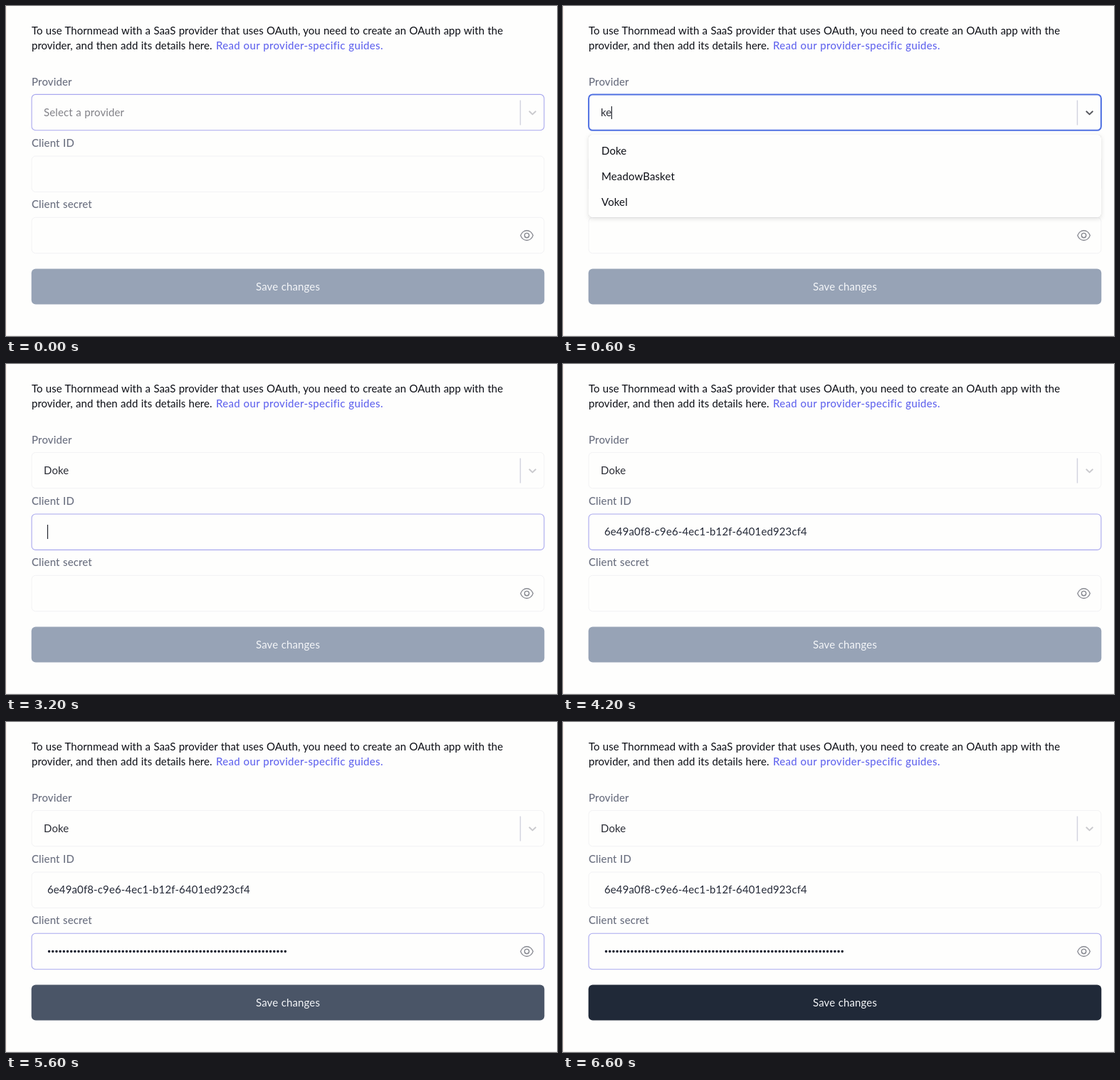
These frames come from a looping animation (774 px wide and 464 px high, 6.8 s). An HTML page:

```html
<!DOCTYPE html>
<html lang="en">
<head>
<meta charset="utf-8">
<title>Provider credentials form</title>
<style>
  html, body { margin: 0; width: 100%; height: 100%; overflow: hidden; background: #fefefd; }
  svg { display: block; width: 774px; height: 464px; }
  text { font: 400 15px Lato, "Open Sans", sans-serif; letter-spacing: .12px; word-spacing: .5px; fill: #0d0f16; white-space: pre; }
  .intro { letter-spacing: 0; }
  .label { font-weight: 500; fill: #6b7080; }
  .link { font-weight: 500; fill: #6467ee; letter-spacing: .3px; }
  .save { fill: #f4f6f9; text-anchor: middle; }
  .value { fill: #252a38; }
  .line { fill: none; stroke-linecap: round; stroke-linejoin: round; }
  .menu { filter: drop-shadow(0 0 .6px rgba(0,0,0,.28)) drop-shadow(0 2px 3px rgba(0,0,0,.12)); }
</style>
</head>
<body>
<svg viewBox="0 0 774 464">
  <rect width="774" height="464" fill="#fefefd"/>
  <path d="M.5 0V464" stroke="#fdeee8"/>
  <path d="M0 463.5H774" stroke="#f0efee"/>

  <text class="intro" x="36" y="39.5">To use Thornmead with a SaaS provider that uses OAuth, you need to create an OAuth app with the</text>
  <text class="intro" x="36" y="61">provider, and then add its details here.</text>
  <text class="link" x="295" y="61">Read our provider-specific guides.</text>

  <text class="label" x="36" y="111.5">Provider</text>
  <text class="label" x="36" y="197.5">Client ID</text>
  <text class="label" x="36" y="284">Client secret</text>

  <g id="fields" fill="#fefefd">
    <rect x="36.1" y="124.4" width="719.8" height="50.4" rx="5.5"/>
    <rect x="36.1" y="211" width="719.8" height="50.4" rx="5.5"/>
    <rect x="36.1" y="297.3" width="719.8" height="50.4" rx="5.5"/>
  </g>

  <text id="provider" x="53" y="154.5"></text>
  <path d="M722.5 132.5V167.5" stroke="#d1d2de" stroke-width="1.4"/>
  <path id="chevron" class="line" d="M735.3 148.3L739.6 152.4L743.9 148.3" stroke-width="1.9"/>

  <text id="clientId" class="value" x="58" y="241"></text>
  <path id="dots" class="line" d="M60.6 322.6H392.4" stroke="#1c2130" stroke-width="3.6" stroke-dasharray="0 5.183"/>
  <g class="line" transform="translate(731.6 322.6) scale(.86) translate(-12 -12)" stroke="#85878f" stroke-width="1.6">
    <path d="M2 12.3a1 1 0 0 1 0-.6C3.4 7.5 7.4 4 12 4s8.6 3.5 10 7.7a1 1 0 0 1 0 .6C20.6 16.5 16.6 20 12 20S3.4 16.5 2 12.3z"/>
    <circle cx="12" cy="12" r="3.7"/>
  </g>

  <rect id="button" x="35.7" y="369.5" width="720.6" height="50" rx="6"/>
  <text class="save" x="396" y="399.5">Save changes</text>

  <g id="menu" class="menu">
    <rect id="panel" x="36" y="181" width="720" rx="4.5" fill="#fefefd"/>
    <g id="options"></g>
  </g>
  <path id="caret" stroke="#23262f" stroke-width="1.2"/>
</svg>

<script>
const LOOP = 6800;
const ROW = 36;
const $ = id => document.getElementById(id);
const fields = [...$('fields').children];

const idle = ['#f2f2f4', 1];
const focus = ['#a9a8ee', 1.1];
const active = ['#4f70e2', 2];
const settling = ['#72a0ea', 1.5];

const matches = ['Doke', 'MeadowBasket', 'Vokel'];
const all = ['Aldervane', 'Brookpost', 'Cindermail', 'Doke', 'Elmledger', 'Fernclock', 'Gladecart'];
const withK = ['Brookpost', 'Doke', 'Fernclock', 'Kindlefold', 'Larkspool', 'MeadowBasket', 'Vokel'];
const secretEnd = 394.5;

const start = {
  provider: 'Select a provider', hint: true, open: null, chevron: '#c9c9cd',
  borders: [focus, idle, idle], clientId: '', secret: false, caret: null, button: '#97a3b6'
};

// Each step keeps whatever it does not override.
const steps = [
  [200, { open: all, borders: [active, idle, idle], chevron: '#55565c', caret: 'hint' }],
  [400, { open: withK, provider: 'k', hint: false, caret: 'provider' }],
  [600, { open: matches, provider: 'ke' }],
  [1400, { caret: null }],
  [1600, { open: null, provider: 'Doke' }],
  [2000, { borders: [settling, idle, idle], caret: 'clientId' }],
  [3200, { borders: [idle, focus, idle], chevron: '#c9c9cd' }],
  [3400, { clientId: '6e49a0f8-c9e6-4ec1-b12f-6401ed923cf4' }],
  [4200, { caret: null }],
  [4600, { borders: [idle, idle, focus], caret: 'secret' }],
  [5000, { secret: true }],
  [5200, { button: '#283241' }],
  [5400, { button: '#202938', caret: null }],
  [5600, { button: '#4a5567' }],
  [6000, { button: '#2d3848' }],
  [6600, { button: '#202938' }]
];

function stateAt(time) {
  return Object.assign({}, start, ...steps.filter(([at]) => at <= time).map(step => step[1]));
}

function set(el, attrs) {
  for (const name in attrs) el.setAttribute(name, attrs[name]);
}

function drawMenu(names) {
  $('menu').style.display = names ? '' : 'none';
  if (!names) return;
  const pad = names.length > 3 ? 18 : 8;
  set($('panel'), { height: names.length * ROW + pad });
  $('options').innerHTML = names
    .map((name, i) => `<text x="54" y="${208.5 + i * ROW}">${name}</text>`)
    .join('');
}

function textEnd(id, x) {
  const el = $(id);
  return x + (el.textContent ? el.getComputedTextLength() : 0.5);
}

function drawCaret(state) {
  const places = {
    hint: () => [53.5, 141, 18],
    provider: () => [textEnd('provider', 53), 141, 18],
    clientId: () => [textEnd('clientId', 58), 226, 20],
    secret: () => [state.secret ? secretEnd : 58.5, 313, 19]
  };
  if (!state.caret) return $('caret').removeAttribute('d');
  const [x, y, height] = places[state.caret]();
  set($('caret'), { d: `M${x} ${y}v${height}` });
}

function draw(time) {
  const state = stateAt(time);
  fields.forEach((el, i) => {
    const [stroke, width] = state.borders[i];
    set(el, { stroke, 'stroke-width': width });
  });
  $('provider').textContent = state.provider;
  $('provider').style.fill = state.hint ? '#818187' : '#2a2c35';
  $('clientId').textContent = state.clientId;
  $('dots').style.display = state.secret ? '' : 'none';
  set($('chevron'), { stroke: state.chevron });
  set($('button'), { fill: state.button });
  drawMenu(state.open);
  drawCaret(state);
}

const began = performance.now();
function tick() {
  draw((performance.now() - began) % LOOP);
  requestAnimationFrame(tick);
}
tick();
</script>
</body>
</html>
```
